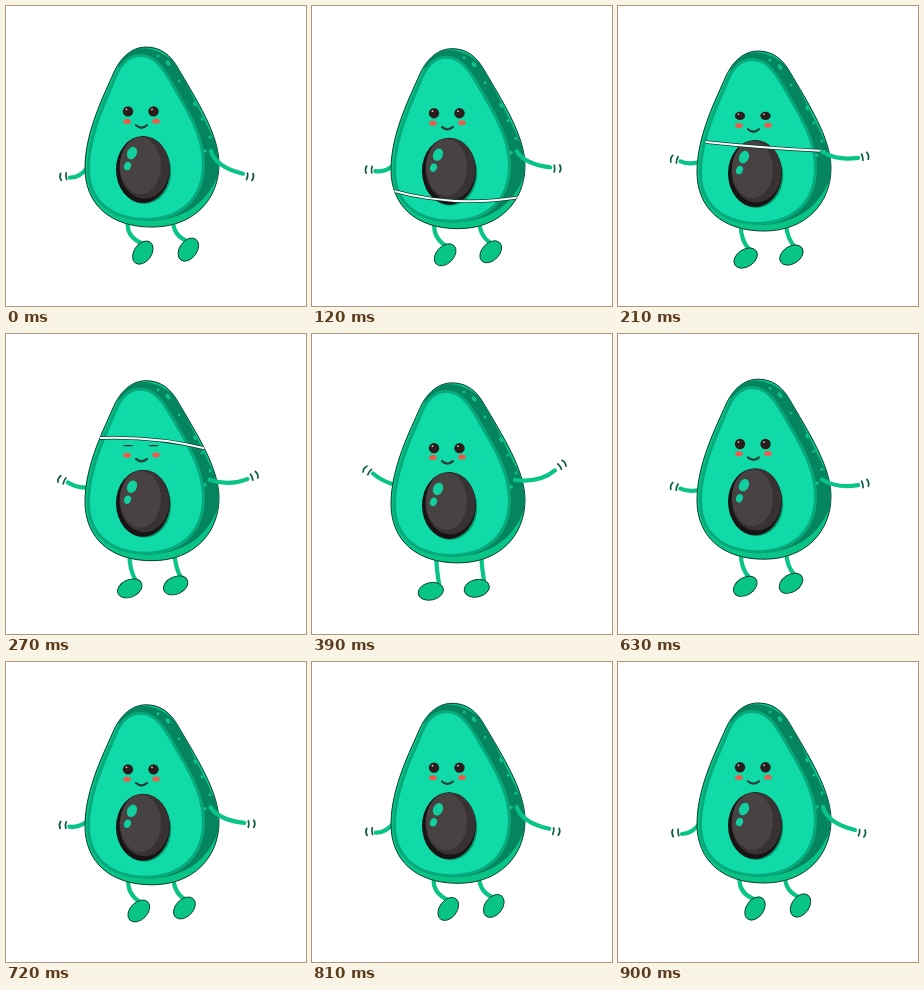
Animation, 300 px wide and 300 px high, one loop 930 ms. Source, as an HTML page:

```html
<!DOCTYPE html>
<html>
<head>
<meta charset="utf-8">
<style>
  html, body { margin: 0; width: 100%; height: 100%; overflow: hidden; background: #fff; }
  svg { display: block; width: 100vw; height: 100vh; }
  .limb { fill: none; stroke: #08c487; stroke-width: 4.2; stroke-linecap: round; }
  .foot { fill: #08c487; stroke: #06402f; stroke-width: .9; }
  .hand { fill: none; stroke: #0a5c45; stroke-width: 1.7; stroke-linecap: round; }
</style>
</head>
<body>
<svg viewBox="0 0 300 300">
  <defs>
    <path id="shape" d="M140 41C126 41 115 51 108 66C99 87 79 125 79 162C79 198 104 221 146 221C188 221 213 193 213 158C213 128 190 93 172 62C164 48 154 41 140 41Z"/>
    <clipPath id="inside"><use href="#shape"/></clipPath>
    <path id="hand" class="hand" d="M-2.500-3.500q-2 3.500 0 7M3-3.500q-1 3 0 6.500"/>
  </defs>

  <path id="legL" class="limb"/>
  <path id="legR" class="limb"/>
  <ellipse id="footL" class="foot" rx="12.800" ry="8.700"/>
  <ellipse id="footR" class="foot" rx="12.800" ry="8.700"/>
  <path id="armL" class="limb"/>
  <use id="handL" href="#hand"/>

  <g id="body">
    <use href="#shape" fill="#08c487" stroke="#06402f"/>
    <g clip-path="url(#inside)">
      <path fill="#04855f" d="M112 56C122 38 150 36 172 60L216 150C211 190 184 215 138 215Z"/>
      <path fill="#10dba8" stroke="#07a97b" stroke-width="6" paint-order="stroke" d="M134 51C148 51 155 62 164 77C178 102 196 128 196 158C196 192 174 211 141 212C105 212 84 193 84 163C84 128 103 91 111 71C116 59 123 51 134 51Z"/>
      <g fill="#11bf8e">
        <ellipse cx="162" cy="57" rx="2" ry="3" transform="rotate(-35 162 57)"/>
        <circle cx="152" cy="50" r="1.500"/>
        <circle cx="173" cy="75" r="1.300"/>
        <ellipse cx="189" cy="98" rx="1.600" ry="2.600" transform="rotate(-25 189 98)"/>
        <circle cx="196" cy="113" r="1.500"/>
        <circle cx="204" cy="131" r="1.600"/>
        <circle cx="199" cy="145" r="1.800"/>
      </g>
    </g>

    <ellipse cx="138.300" cy="165.500" rx="27" ry="32.500" fill="#07946a"/>
    <ellipse cx="137" cy="163.500" rx="27" ry="33.500" fill="#181314"/>
    <ellipse cx="138.500" cy="161.500" rx="25" ry="31" fill="#393233"/>
    <ellipse cx="134.500" cy="159.500" rx="20.500" ry="28.500" fill="#494243"/>
    <ellipse cx="126" cy="147" rx="4.800" ry="6.500" fill="#10d0a0" transform="rotate(25 126 147)"/>
    <ellipse cx="121.500" cy="160" rx="3.400" ry="4.300" fill="#10d0a0" transform="rotate(20 121.500 160)"/>

    <ellipse cx="121" cy="115.500" rx="3.900" ry="2.500" fill="#ee5a4c"/>
    <ellipse cx="150" cy="115.200" rx="3.900" ry="2.500" fill="#ee5a4c"/>
    <path d="M130 119.200q5.500 5 11 0" fill="none" stroke="#2b4038" stroke-width="2.200" stroke-linecap="round"/>
    <g id="eyes">
      <g fill="#2b1d1c"><circle cx="122" r="5.200"/><circle cx="147.500" r="5.200"/></g>
      <g fill="#d8c8c4"><circle cx="120.500" cy="-2" r=".9"/><circle cx="146" cy="-2" r=".9"/></g>
    </g>
    <g id="slice" clip-path="url(#inside)">
      <path id="cutEdge" fill="none" stroke="#06402f" stroke-width="3.400"/>
      <path id="cut" fill="none" stroke="#fff" stroke-width="2"/>
    </g>
  </g>

  <path id="armR" class="limb"/>
  <use id="handR" href="#hand"/>
</svg>
<script>
const LOOP = 930, STEP = 30;
const $ = id => document.getElementById(id);
const set = (id, name, value) => $(id).setAttribute(name, value);
const mix = (a, b, k) => a.map((v, i) => v + (b[i] - v) * k);
const curve = (id, a, b, k, dy = 0) => {
  const [x, y, cx, cy, ex, ey] = mix(a, b, k);
  set(id, 'd', `M${x} ${y + dy}Q${cx} ${cy + dy} ${ex} ${ey + dy}`);
};
// x, y, rotation
const place = (id, a, b, k) => {
  const [x, y, turn] = mix(a, b, k);
  set(id, 'transform', `translate(${x} ${y}) rotate(${turn})`);
};

function draw(t) {
  const k = ((1 - Math.cos((t + 42) / LOOP * 2 * Math.PI)) / 2) ** 1.2;
  const drop = 8 * k;
  set('body', 'transform', `translate(0 ${drop})`);

  const blink = Math.min(1, Math.max(.12, Math.abs(t - 270) / 75));
  set('eyes', 'transform', `translate(0 ${105.3 + k}) scale(1 ${blink})`);

  curve('legL', [122, 214, 119, 231, 138, 238], [124, 222, 125, 238, 127, 251], k);
  curve('legR', [167, 214, 167, 231, 184, 236], [169, 220, 170, 235, 172, 248], k);
  place('footL', [137, 246.5, -55], [118.5, 257.5, -12], k);
  place('footR', [182.5, 243.5, -55], [164.5, 254.5, -12], k);

  curve('armL', [83, 160, 74, 172, 64, 172], [84, 151, 70, 147, 61, 139], k);
  curve('armR', [205, 145, 209, 161, 237, 168], [203, 146, 228, 149, 243, 136], k);
  place('handL', [57.5, 171, -5], [55, 136, 35], k);
  place('handR', [244, 171, 190], [250, 130, 145], k);

  // white cut sweeping up the body
  const s = (t - 120) / 150;
  $('slice').style.display = s > -.4 && s < 1.7 ? '' : 'none';
  for (const id of ['cutEdge', 'cut'])
    curve(id, [78, 184, 145, 203, 214, 190], [94, 104, 150, 102, 202, 115], s, -drop);
}

function tick() {
  draw(Math.floor(performance.now() % LOOP / STEP) * STEP);
  requestAnimationFrame(tick);
}
tick();
</script>
</body>
</html>
```
